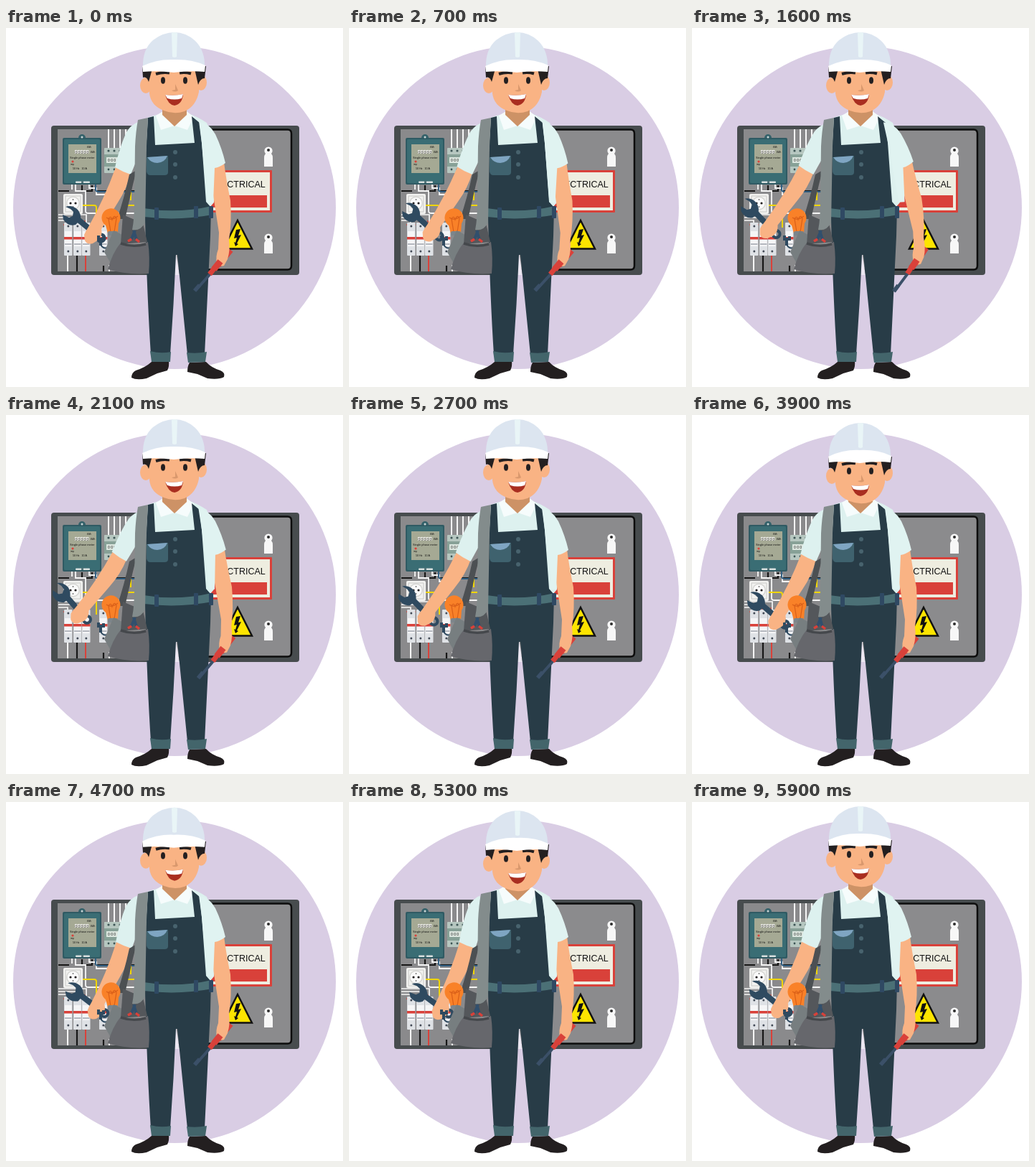
Write an HTML page with a canvas that moves like this. It is 470 by 500 pixels and loops after 6000 ms.

```html
<!DOCTYPE html>
<html lang="en">
<head>
<meta charset="utf-8">
<title>Electrician</title>
<style>
html, body { margin: 0; width: 100%; height: 100%; overflow: hidden; background: #fff; }
canvas { display: block; }
</style>
</head>
<body>
<canvas id="stage" width="470" height="500"></canvas>
<script>
const ctx = document.getElementById('stage').getContext('2d');
const LOOP = 6000, STEP = 100;
const SKIN = '#f9b384', NAVY = '#283c47', TEAL = '#43656b', SHIRT = '#ddf1ef';
const INK = '#231f20', STEEL = '#2f4a60', RED = '#d9413a';

function fill(color, d) {
  ctx.fillStyle = color;
  ctx.fill(new Path2D(d));
}

function line(color, width, d) {
  ctx.strokeStyle = color;
  ctx.lineWidth = width;
  ctx.stroke(new Path2D(d));
}

function box(color, x, y, w, h, r = 0) {
  ctx.fillStyle = color;
  ctx.beginPath();
  ctx.roundRect(x, y, w, h, r);
  ctx.fill();
}

function oval(color, x, y, rx, ry = rx) {
  ctx.fillStyle = color;
  ctx.beginPath();
  ctx.ellipse(x, y, rx, ry, 0, 0, Math.PI * 2);
  ctx.fill();
}

function label(text, x, y, size, align = 'left', color = '#111') {
  ctx.fillStyle = color;
  ctx.font = `${size}px Arial, "Liberation Sans", sans-serif`;
  ctx.textAlign = align;
  ctx.fillText(text, x, y);
}

function turned(x, y, angle, draw) {
  ctx.save();
  ctx.translate(x, y);
  ctx.rotate(angle);
  ctx.translate(-x, -y);
  draw();
  ctx.restore();
}

// Eased interpolation through [time, value] pairs.
function track(keys, t) {
  if (t <= keys[0][0]) return keys[0][1];
  for (let i = 1; i < keys.length; i++) {
    const [t0, a] = keys[i - 1], [t1, b] = keys[i];
    if (t <= t1) {
      const p = (t - t0) / (t1 - t0);
      return a + (b - a) * p * p * (3 - 2 * p);
    }
  }
  return keys[keys.length - 1][1];
}

const driverSwing = [[0, 0], [500, 0.03], [1500, -0.09], [2400, 0]];
const nod = [[3150, 0], [3850, 5], [4400, 0], [5250, 6], [5900, 0]];

// Constant-speed swing, furthest out at 2100 ms and furthest in at 5100 ms.
function wrenchSwing(t) {
  const gap = Math.abs(t - 2100);
  return 0.075 * (2.1 - Math.min(gap, LOOP - gap) / 1000);
}

function meter() {
  oval('#34616a', 106, 153, 5);
  box('#2f5a63', 79, 153, 54, 65, 2);
  box('#3a6d74', 81, 155, 50, 61, 2);
  oval('#c9d6d6', 106, 152, 1.5);
  box('#a5a994', 87, 162, 39, 40);
  label('kWh', 113, 167, 3);
  for (let i = 0; i < 5; i++) {
    box('#f3f3ee', 96 + i * 4, 170, 3.4, 5);
    label('0', 96.6 + i * 4, 174.5, 4.5);
  }
  label('kWh', 118, 174, 3.2);
  label('Single phase meter', 89, 181.5, 4);
  oval(RED, 93, 186, 1.6);
  label('imp', 90, 191, 3);
  label('50 Hz   10 A', 93, 197, 3.6);
  box('#d8e0df', 97, 213.5, 20, 2.5, 1);
  box('#55757a', 105, 213, 3, 3);
}

function wiring() {
  line('#f7f7f7', 2, 'M143 141V168M151 141V168M159 141V168M167 141V180');
  line('#171717', 2.2, 'M73 227H88M106 219V227H120V219M126 227H182');
  line('#f7f7f7', 1.8, 'M97 218V227H111V255Q111 258 115 258H180M92 218V225M116 218V223H126V232H142');
  line('#315f82', 2, 'M125 218V226Q126 228 129 228H180');
  line('#f0d600', 2, 'M105 247H123Q126 247 126 250V278M164 247H182M174 240V228');
  line('#f7f7f7', 1.7, 'M73 260H112V273M73 264H99V274M73 268H86V274');
  line('#d34a40', 1.5, 'M80 274H93M98 270V283M110 268V280');
  line('#f7f7f7', 2, 'M86 316V339M144 330V339');
  line('#171717', 2.2, 'M99 316V339M136 331V339');
  line(RED, 2, 'M111 316V339');
}

function fuses() {
  box('#f2f2f0', 80, 231, 27, 28, 2);
  line('#c9c9c7', 1, 'M83 234H104V256H83Z');
  oval('#d5d5d2', 93.5, 244, 9.5);
  oval('#fafafa', 93.5, 244, 8);
  oval(INK, 90, 244, 1.6);
  oval(INK, 97, 244, 1.6);
  oval('#777', 93.5, 239, 1);
  oval('#777', 93.5, 249, 1);
  for (const x of [81, 94, 106, 130]) {
    box('#dfe2e6', x, 271, 11.5, 46, 1);
    box('#f5f5f6', x + 1, 283, 9.5, 21);
    box(RED, x, 291, 11.5, 3.5);
    box('#b4b8bf', x + 1, 300, 9.5, 2);
    oval('#434b57', x + 5.8, 276, 1.5);
    oval('#434b57', x + 5.8, 311, 1.5);
  }
  box('#b6c7c0', 137, 167, 30, 35, 1);
  box('#87a197', 137, 176, 30, 17);
  box('#dce6df', 140, 180, 19, 8);
  label('0 0 0', 142, 186, 5);
  for (const x of [143, 151, 159]) {
    oval('#3d5555', x, 171, 1.6);
    oval('#3d5555', x, 197, 1.4);
  }
}

function door() {
  box('#8b8b8d', 240, 141, 158, 196, 4);
  line('#0d0d0d', 2.5, 'M240 141.5H393Q398 141.5 398 147V331Q398 336.5 393 336.5H240');
  box(RED, 272, 198, 99, 59, 1);
  box('#eeede0', 275, 201, 93, 53);
  label('ELECTRICAL', 361.8, 222, 12.5, 'right');
  box(RED, 279, 233, 85, 17);
  fill('#fde400', 'M323 268L343 307.5H303Z');
  line('#111', 2.5, 'M323 268L343 307.5H303Z');
  fill('#111', 'M321 281L327 280L324 289L328 288L322 300L324 301L320 304L318 298L320 299L322 292L318 293Z');
  for (const y of [171, 292]) {
    fill('#f7f7f7', `M360 ${y + 22}V${y + 10}Q360 ${y + 6} 362 ${y + 4}A5.6 5.6 0 1 1 370 ${y + 4}Q372 ${y + 6} 372 ${y + 10}V${y + 22}Z`);
    oval('#2d2d2d', 366, y - 1, 2);
  }
}

function cabinet() {
  box('#474c4e', 63, 136, 346, 208, 4);
  box('#8a8a8c', 72, 141, 168, 198);
  wiring();
  meter();
  fuses();
  door();
}

function wrenchArm() {
  line(STEEL, 8, 'M96 263L130 291');
  line(STEEL, 4, 'M129 289a5 5 0 1 1 -.1 .1');
  fill(STEEL, 'M83 249Q92 246 100 253Q105 259 104 267L97 274Q87 277 80 267L79 260L88 264L93 262L94 256L90 252Z');
  fill(SKIN, 'M153 194L174 201Q169 223 156 243L133 280Q135 289 129 295L121 300Q113 302 110 296L109 288Q111 283 115 277Q137 238 153 194Z');
  fill(SHIRT, 'M184 131Q174 135 168 145Q159 164 152 194Q162 200 174 204L190 165Z');
}

function torso() {
  fill('#ece7f2', 'M236 305L242 344H235Z');
  fill(INK, 'M175 487Q175 480 181 477Q194 473 203 465L227 464Q228 471 225 477L211 481L196 488Q182 491 175 487Z');
  fill(INK, 'M253 479Q253 471 256 466L279 465Q286 473 299 477Q306 480 304 486Q297 490 281 488L267 482Z');
  fill(SHIRT, 'M184 131Q202 122 218 119L252 118Q268 124 280 132L294 170L290 243L284 250H194L181 190Z');
  fill('#f6fcfc', 'M209 122L219 116L235 135L252 116L262 124L253 142L235 136L216 142Z');
  fill('#cd9266', 'M218 108H252V121L235 137L218 121Z');
  fill(NAVY, 'M198 125L206 123L208 163L263 160L259 123L270 132L273 160L279 242L286 250L285 290L277 455H253L239 316L237 316Q234 385 229 455H202Q197 380 194 265L193 205Z');
  fill(TEAL, 'M201 450Q216 454 230 451L229 465H203Z');
  fill(TEAL, 'M252 452Q266 454 280 451L278 465L254 466Z');
  fill('#4b7076', 'M192 251Q239 259 287 248L288 260Q240 269 193 263Z');
  for (const x of [207, 262, 283]) box('#2f4963', x, x === 207 ? 250 : 248, 6, 17, 1);
  fill('#3f626e', 'M196 180L226 178V201Q226 205 221 205H201Q197 205 196 200Z');
  fill('#7fa5c2', 'M197 180L225 178Q222 187 211 188Q202 188 197 180Z');
  for (const y of [173, 190, 208]) oval('#48636e', 236, y, 3);
}

function bulb() {
  fill('#f98128', 'M142 286L139 275A13 13 0 1 1 157 272L156 285Z');
  line('#d95f19', 1.2, 'M146 284L143 266Q146 260 148 267Q151 259 154 265L151 284M140 264Q147 269 156 262');
  box('#7c858b', 142, 283, 14, 6, 2);
}

function bag() {
  fill('#4c5053', 'M172 204L182 198L177 218L166 266H155Q165 236 172 204Z');
  bulb();
  line(STEEL, 4, 'M132 292V303M129 289V296M136 290V296');
  line(STEEL, 2, 'M132 302Q136 308 141 306');
  fill('#777e80', 'M150 282L168 291L149 333L137 312Z');
  fill('#54575b', 'M163 260L191 272L197 298L160 301Z');
  line('#314f6d', 4, 'M175 294L180 282M182 295L178 282');
  line(RED, 3.5, 'M170 297L175 294M181 294L186 298');
  fill('#66676c', 'M160 299Q178 306 198 298Q201 319 199 342Q167 344 142 336Q148 314 160 299Z');
  line('#45484c', 3.5, 'M160 300Q177 306 195 301');
  fill('#838c8c', 'M184 128L198 125Q197 143 196 165L194 271Q188 283 176 281Q179 266 179 243L180 165Q181 144 184 128Z');
}

function driverArm() {
  line('#3b5068', 4, 'M288 339L264 366');
  line('#3b5068', 5.5, 'M270 358L263 366');
  line(RED, 9, 'M313 309L296 330');
  fill(SKIN, 'M288 190L304 187Q307 211 313 240Q315 270 311 295Q313 309 309 322L304 331Q298 333 294 328Q292 318 296 308L297 285L289 233Z');
  line(RED, 9, 'M299 325L290 336');
  line(RED, 7, 'M291 334L284 343');
  fill('#e0f3f1', 'M269 130Q284 133 292 148Q301 167 306 188Q298 194 291 195L289 243L281 243L273 160Z');
}

function head() {
  oval(SKIN, 195, 80, 8, 11);
  oval(SKIN, 272, 76, 8, 11);
  fill(SKIN, 'M199 54H269V89Q265 109 249 116Q235 121 220 115Q202 108 200 91Z');
  fill(INK, 'M190 53L204 57L199 75Q196 67 191 69Z');
  fill(INK, 'M279 53L263 57L268 79Q271 70 277 70Z');
  line(INK, 4, 'M209 64Q219 61 228 62.5M242 62.5Q250 61 258 63.5');
  oval(INK, 219, 73, 3, 4.7);
  oval(INK, 250, 73, 3, 4.7);
  fill('#d9986d', 'M236 78L240 87Q236 90 231 87L236 86Z');
  fill('#a92e20', 'M222 93Q235 95 247 92Q246 106 235 108Q226 107 222 93Z');
  fill('#fff', 'M222 93Q235 95 247 92L245 98Q235 101 225 98Z');
  fill('#dce5f0', 'M191 55Q190 30 205 17Q219 6 235 6Q251 6 264 18Q278 32 277 55Z');
  fill('#e9f5f7', 'M231 7Q235 5 239 7L238 40Q235 42 232 40Z');
  fill('#fff', 'M190 53Q211 43 234 44Q259 43 278 52L277 61Q257 59 234 62Q211 59 191 61Z');
}

function draw(t) {
  ctx.fillStyle = '#fff';
  ctx.fillRect(0, 0, 470, 500);
  oval('#d9cde4', 235, 250, 225);
  cabinet();
  turned(172, 165, wrenchSwing(t), wrenchArm);
  torso();
  bag();
  turned(283, 155, track(driverSwing, t), driverArm);
  ctx.save();
  ctx.translate(0, track(nod, t));
  head();
  ctx.restore();
}

const start = performance.now();
function tick() {
  const t = (performance.now() - start) % LOOP;
  draw(Math.floor(t / STEP) * STEP);
  requestAnimationFrame(tick);
}
tick();
</script>
</body>
</html>
```
